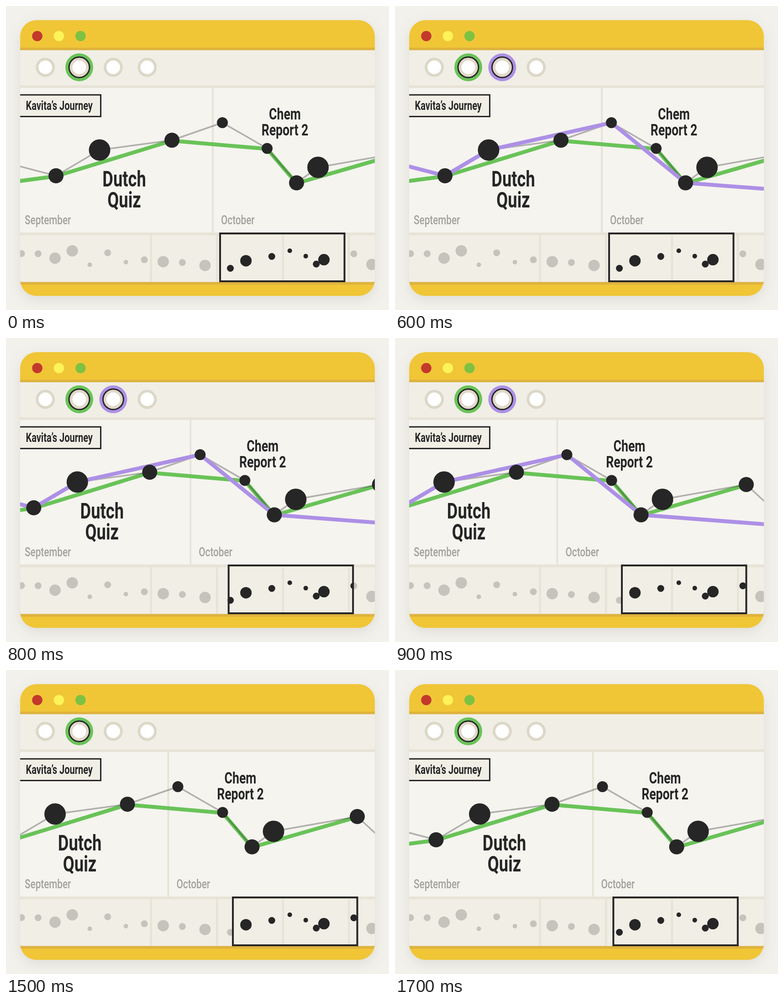
These frames come from a looping animation (839x667 px, 1.8 s). An HTML page:

```html
<!DOCTYPE html>
<html lang="en">
<head>
<meta charset="utf-8">
<title>Student journey timeline</title>
<style>
  html, body { margin: 0; width: 100%; height: 100%; overflow: hidden; background: #f2f1ec; }
  svg { display: block; width: 100%; height: 100%; }
  text { font: 600 27px Roboto, "Open Sans", sans-serif; fill: #262626; }
  .shadow { filter: drop-shadow(0 8px 14px rgba(60, 50, 20, .1)); }
  .line { fill: none; stroke-width: 8.5px; stroke-linejoin: round; }
  .thin { stroke-width: 3.5px; stroke-opacity: .33; }
  .month { font-size: 28px; font-weight: 500; fill: #a3a29e; }
  .middle { text-anchor: middle; }
  .report { font-size: 36px; }
  .quiz { font-size: 49px; }
</style>
</head>
<body>
<svg viewBox="0 0 839 667">
  <defs>
    <clipPath id="window"><rect x="31" y="31" width="777" height="605" rx="36"/></clipPath>
    <clipPath id="view"><rect class="view" y="499" width="272.5" height="105"/></clipPath>
  </defs>
  <rect class="shadow" x="31" y="31" width="777" height="605" rx="36" fill="#f0c637"/>
  <g clip-path="url(#window)">
    <path fill="#deb23f" d="M31 91.5h777v520H31z"/>
    <path fill="#f0c637" d="M31 611.5h777v25H31z"/>
    <path fill="#f0eee5" d="M31 97h777v508.500H31z"/>
    <path fill="#f5f4ef" d="M31 180h777v317H31z"/>
    <path fill="#e7e3d7" d="M31 174h777v6H31zM31 497h777v6H31z"/>
    <g id="dividers" fill="#e7e3d7"></g>
    <g id="header"></g>
    <g id="chart"></g>
    <rect x="20" y="195" width="187.5" height="47.5" fill="#f0eee5" stroke="#262626" stroke-width="3"/>
    <g id="fixedText"></g>
    <g id="mapDots" fill="#c5c3bb"></g>
    <g id="viewDots" fill="#262626" clip-path="url(#view)"></g>
    <rect class="view" y="499" width="272.5" height="105" fill="none" stroke="#262626" stroke-width="4"/>
  </g>
</svg>
<script>
const $ = id => document.getElementById(id);
const GREEN = "#69c358", PURPLE = "#ad90e6", INK = "#262626";
const CONDENSED = 0.74;
const STEP = 100, STEPS = 18;
const NODE_RADIUS = { S: 12, M: 16.5, L: 23.5 };
const MAP_RADIUS = { S: 5, M: 7.5, L: 12.5 };

const range = (count, make) => Array.from({ length: count }, (_, i) => make(i));
const clamp = (value, low, high) => Math.max(low, Math.min(high, value));
const disc = (x, y, r, fill) =>
  `<circle cx="${x}" cy="${y}" r="${r}"${fill ? ` fill="${fill}"` : ""}/>`;
const line = (points, color, style = "", id = "") =>
  `<polyline id="${id}" class="line ${style}" stroke="${color}" points="${points.join(" ")}"/>`;
const label = (x, y, text, style = "") =>
  `<text class="${style}" transform="translate(${x} ${y}) scale(${CONDENSED} 1)">${text}</text>`;

// Header: window buttons and student toggles.
const toggleX = i => 86.1 + 74.4 * i;
const rings = (x, radii, colors) =>
  radii.map((r, i) => disc(x, 134.5, r, colors[i])).join("");
const toggle = i => rings(toggleX(i), [21, 15], ["#dcd8c8", "#fff"]);
const activeToggle = (i, color) =>
  rings(toggleX(i), [30.5, 24, 21, 15], [color, INK, "#e1d8ca", "#fff"]);

$("header").innerHTML =
  ["#c3392b", "#fff35a", "#7dc242"].map((c, i) => disc(68.5 + 47.4 * i, 66, 11.3, c)).join("") +
  range(4, toggle).join("") + activeToggle(1, GREEN) +
  `<g id="purpleToggle">${activeToggle(2, PURPLE)}</g>`;

$("dividers").innerHTML =
  range(4, i => `<rect x="${315.5 + 144.5 * i}" y="500" width="4.5" height="105"/>`).join("");

// Events on the chart; each student's line picks some of them.
const events = [
  [-46, 332], [109.5, 372.5], [205, 316], [363.5, 294.5], [474, 256],
  [572, 312.5], [636.5, 388], [683.5, 354], [867, 321.5], [978, 425]
];
const sizes = [..."LMLMSSMLML"];
const pick = (...indexes) => indexes.map(i => events[i]);
const lower = ([x, y]) => [x, y + 1];

$("chart").innerHTML =
  `<rect x="451" y="180" width="4" height="317" fill="#e7e3d7"/>` +
  line([[-46, 393], ...pick(1, 3, 5, 6, 8)].map(lower), GREEN) +
  line(events, INK, "thin") +
  line([...pick(0, 1, 2, 4, 6), [978, 414]], PURPLE, "", "purpleLine") +
  `<g fill="${INK}">` +
  events.map(([x, y], i) => disc(x, y, NODE_RADIUS[sizes[i]])).join("") + "</g>" +
  label(611, 249, "Chem", "middle report") + label(611, 284, "Report 2", "middle report") +
  label(259, 396, "Dutch", "middle quiz") + label(259, 442, "Quiz", "middle quiz") +
  label(471, 479, "October", "month");
$("fixedText").innerHTML =
  label(43.5, 227.5, "Kavita’s Journey") + label(41, 479, "September", "month");

// Overview: older events zigzag along a gentle slope, then the chart in miniature.
const olderDots = [..."MMLLSMSMLM"].map((size, i) => {
  const zigzag = (-1) ** i * 16 * Math.exp(-(((i - 4) / 2) ** 2));
  return disc(34 + 36 * i + 0.35 * i * i, 543 + 2.2 * i + zigzag, MAP_RADIUS[size]);
});
const miniature = events.map(([x, y], i) => {
  const dx = x - 489, dy = y - 327;
  return disc(627 + 0.357 * dx, 554.6 + 0.252 * dy - 0.025 * dx, MAP_RADIUS[sizes[i]]);
});
$("mapDots").innerHTML = $("viewDots").innerHTML = [...olderDots, ...miniature].join("");

function draw(time) {
  const step = Math.floor(time / STEP) % STEPS;
  // The purple line fades in, then the view scrolls; the way back starts with the fade.
  const purple = clamp(Math.min(step - 4, 15 - step), 0, 2) / 2;
  const level = clamp(Math.min(step - 6, STEPS - step), 0, 3);
  const pan = 97.5 * [0, 0.2, 0.5, 1][level];

  $("purpleLine").setAttribute("opacity", purple);
  $("purpleToggle").setAttribute("opacity", purple);
  $("chart").setAttribute("transform", `translate(${-pan} 0)`);
  for (const rect of document.querySelectorAll(".view"))
    rect.setAttribute("x", 469 + 28 * level / 3);
}

const begin = performance.now();
function tick() {
  draw(performance.now() - begin);
  requestAnimationFrame(tick);
}
tick();
</script>
</body>
</html>
```
